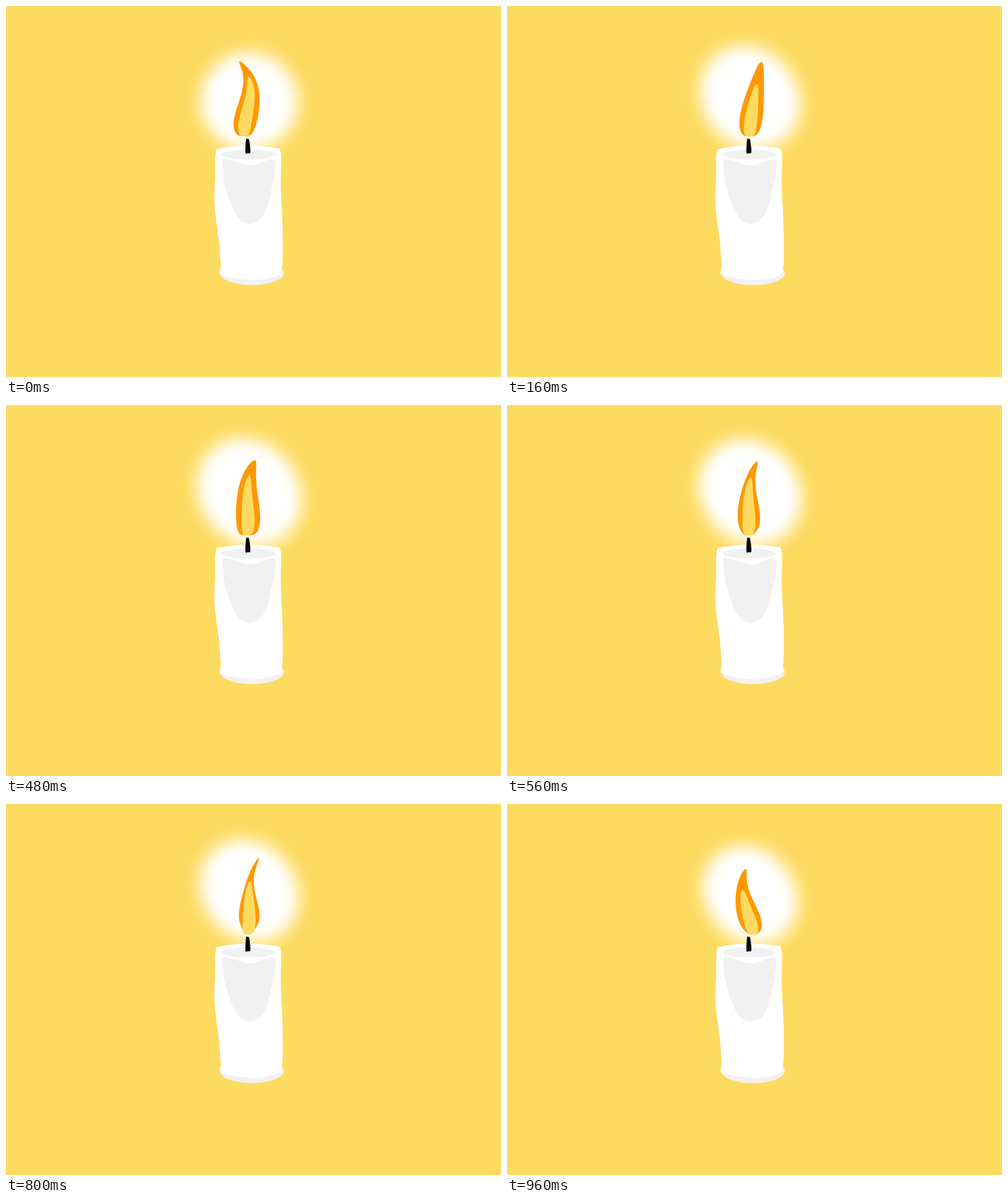
An HTML page with a canvas for the animation above (1040 ms loop, 800x600 px).

```html
<!DOCTYPE html>
<html lang="en">
<head>
<meta charset="utf-8">
<title>Candle</title>
<style>
  html, body { margin: 0; width: 100%; height: 100%; overflow: hidden; background: #fddb60; }
  canvas { display: block; }
</style>
</head>
<body>
<canvas id="stage" width="800" height="600"></canvas>
<script>
const ctx = document.getElementById('stage').getContext('2d');
const STEP = 80, STEPS = 13, FOOT = 211;
const YELLOW = '#fddb60', ORANGE = '#ff9800', GREY = '#f1f1f1';

// spine: x at four even heights, foot to tip; top: y of the tip
// width: tip and belly half-widths; pinch: how fast the belly narrows
// core: height of the inner flame; glow: centre y, long and short radius
const poses = [
  { at: 0, spine: [385, 390, 395, 377], top: 89, width: [4, 15], pinch: 1, core: .8, glow: [154, 79, 79] },
  { at: 2, spine: [392, 396, 403, 411], top: 90, width: [4.5, 14], pinch: 1, core: .7, glow: [148, 88, 77] },
  { at: 4, spine: [394, 396, 391, 383], top: 88, width: [2, 17], pinch: .8, core: .71, glow: [150, 82, 77] },
  { at: 6, spine: [390, 391, 391, 402], top: 89, width: [5, 14.5], pinch: .8, core: .8, glow: [141, 92, 80] },
  { at: 9, spine: [391, 390, 393, 409], top: 95, width: [4.5, 11], pinch: 3, core: .75, glow: [141, 86, 77] },
  { at: 11, spine: [391, 396, 395, 409], top: 80, width: [2, 16], pinch: 1.7, core: .64, glow: [139, 89, 74] },
  { at: 12, spine: [398, 389, 381, 386], top: 105, width: [4.5, 14], pinch: 1.4, core: .68, glow: [147, 84, 72] }
];

const body = [339,237, 348,230, 390,226, 432,229, 444,237, 444,290, 447,360, 446,424,
  434,438, 396,443, 349,435, 347,418, 344,380, 337,320, 338,275];
const shade = [350,251, 361,249, 396,258, 434,250, 428,302, 415,340, 393,352, 372,338, 354,290];
const wick = [388,216, 390,215, 393,217, 395,236, 391,238, 387,237];

function mix(a, b, k) {
  if (typeof a === 'number') return a + (b - a) * k;
  const out = Array.isArray(a) ? [] : {};
  for (const key in a) out[key] = mix(a[key], b[key], k);
  return out;
}

function poseAt(step) {
  const i = poses.findIndex(p => p.at >= step);
  const b = poses[i], a = poses[Math.max(0, i - 1)];
  return b.at === step ? b : mix(a, b, (step - a.at) / (b.at - a.at));
}

// Cubic through the four spine points, u from 0 to 1.
function spineX([a, b, c, d], u) {
  const s = 3 * u;
  return a + (b - a) * s
    + (c - 2 * b + a) * s * (s - 1) / 2
    + (d - 3 * c + 3 * b - a) * s * (s - 1) * (s - 2) / 6;
}

// A tongue of fire along the spine, up to the given share of its height.
function tongue({ spine, top }, height, [tip, belly], pinch, color) {
  const left = [], right = [], N = 60;
  for (let i = 0; i <= N; i++) {
    const v = i / N, u = v * height;
    const bell = Math.max(0, Math.sin(Math.PI * Math.sqrt(v))) ** pinch;
    const half = tip * Math.sqrt(1 - v ** 12) + belly * bell;
    const x = spineX(spine, u), y = FOOT + (top - FOOT) * u;
    left.push([x - half, y]);
    right.unshift([x + half, y]);
  }
  ctx.fillStyle = color;
  ctx.beginPath();
  for (const [x, y] of left.concat(right)) ctx.lineTo(x, y);
  ctx.fill();
}

function oval(x, y, rx, ry, color, tilt = 0) {
  ctx.fillStyle = color;
  ctx.beginPath();
  ctx.ellipse(x, y, rx, ry, tilt, 0, 2 * Math.PI);
  ctx.fill();
}

// Fills a smooth closed curve through the points.
function blob(pts, color) {
  const n = pts.length;
  const at = i => pts[(i + n) % n];
  const out = i => at(i) + (at(i + 2) - at(i - 2)) / 6;
  const into = i => at(i) - (at(i + 2) - at(i - 2)) / 6;
  ctx.fillStyle = color;
  ctx.beginPath();
  ctx.moveTo(pts[0], pts[1]);
  for (let i = 0; i < n; i += 2) {
    ctx.bezierCurveTo(out(i), out(i + 1), into(i + 2), into(i + 3), at(i + 2), at(i + 3));
  }
  ctx.fill();
}

function draw(now) {
  const pose = poseAt(Math.floor(now / STEP) % STEPS);
  const [glowY, long, short] = pose.glow;
  ctx.fillStyle = YELLOW;
  ctx.fillRect(0, 0, 800, 600);

  ctx.filter = 'blur(13px)';
  oval(393, glowY, long, short, '#fff', .9);
  ctx.filter = 'none';

  oval(397.5, 432, 51.5, 19.5, GREY);
  blob(body, '#fff');
  oval(391.5, 240, 43, 8, GREY);
  blob(shade, GREY);
  blob(wick, '#080808');

  tongue(pose, 1, pose.width, pose.pinch, ORANGE);
  tongue(pose, pose.core, [3, 7.5], .8, YELLOW);
  requestAnimationFrame(draw);
}
draw(0);
</script>
</body>
</html>
```
